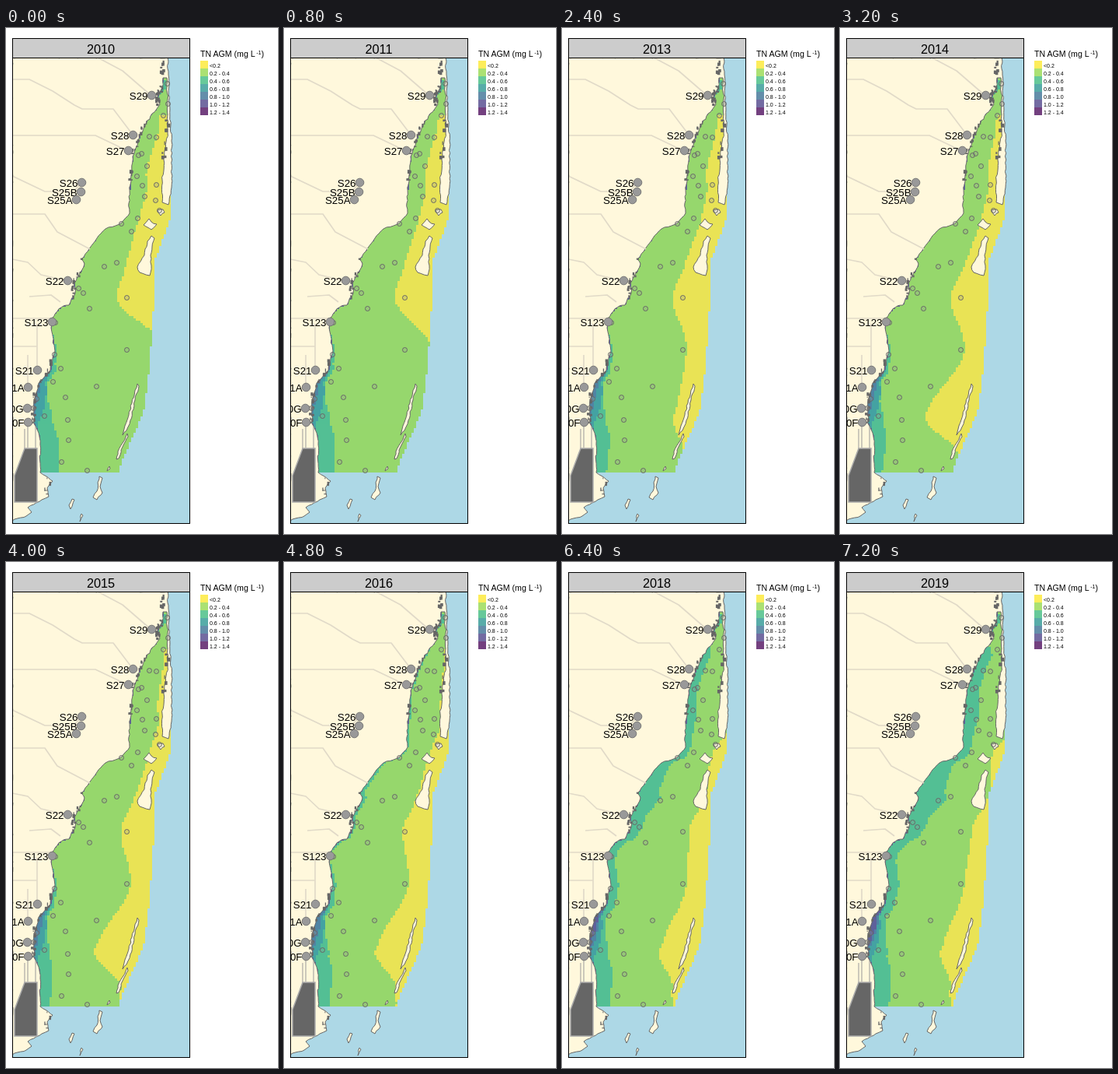
These frames come from a looping animation (350x650 px, 8000 ms). An HTML page:

```html
<!DOCTYPE html>
<html lang="en">
<head>
<meta charset="utf-8">
<title>TN AGM by year</title>
<style>
html, body { margin: 0; width: 100%; height: 100%; overflow: hidden; background: #fff; }
svg { display: block; }
text { font-family: "Liberation Sans", Arial, sans-serif; }
</style>
</head>
<body>
<svg width="350" height="650" viewBox="0 0 350 650">
  <defs><clipPath id="panel"><rect x="8.5" y="38.5" width="228" height="598"/></clipPath></defs>
  <g clip-path="url(#panel)">
    <rect x="8" y="38" width="229" height="599" fill="#add8e6"/>
    <g id="bands" opacity=".75" shape-rendering="crispEdges"></g>
    <g id="land" fill="#fff8dc" stroke="#666" stroke-linejoin="round"></g>
    <g id="canals" fill="none" stroke="#e1dac8" stroke-width="1.7" stroke-linejoin="round"></g>
    <g id="docks" fill="#666"></g>
    <path d="M28 510V539M24 515V540M38 512V540" stroke="#999"/>
    <path d="M24 540H40V609H11V575Z" fill="#666" stroke="#aaa" stroke-width="1.5"/>
    <g id="samples" fill="#999" fill-opacity=".25" stroke="#666"></g>
    <g id="stations" font-size="13.3" text-anchor="end"></g>
  </g>
  <rect x="8.5" y="13.5" width="228" height="25" fill="#ccc" stroke="#000"/>
  <rect x="8.5" y="38.5" width="228" height="598" fill="none" stroke="#000"/>
  <text id="year" x="122" y="33" font-size="16.3" text-anchor="middle"></text>
  <text x="250" y="37" font-size="10.6">TN AGM (mg L<tspan dy="-3.5" dx="1.5" font-size="7">-1</tspan><tspan dy="3.5">)</tspan></text>
  <g id="legend" font-size="7"></g>
</svg>
<script>
const NS = "http://www.w3.org/2000/svg";
const $ = id => document.getElementById(id);
function add(parent, tag, attrs, text) {
  const el = document.createElementNS(NS, tag);
  for (const k in attrs) el.setAttribute(k, attrs[k]);
  if (text) el.textContent = text;
  return $(parent).appendChild(el);
}
const pairs = s => s.split(" ").map(p => p.split(",").map(Number));

let seed = 7;
function rand() {
  seed = (seed * 16807) % 2147483647;
  return seed / 2147483647;
}

// Value at y through [y, value] keys, held beyond both ends
const linear = u => u;
const smooth = u => u * u * (3 - 2 * u);
function along(keys, y, ease = linear) {
  const i = keys.findIndex(k => k[0] >= y);
  if (i < 0) return keys[keys.length - 1][1];
  if (i === 0) return keys[0][1];
  const [a, u] = keys[i - 1], [b, v] = keys[i];
  return u + (v - u) * ease((y - a) / (b - a));
}

// Ragged outline through [x, y] points
function ragged(points, amp) {
  let d = "";
  points.forEach(([x, y], i) => {
    const [u, v] = points[(i + 1) % points.length];
    const n = Math.max(1, Math.round(Math.hypot(u - x, v - y) / 4));
    for (let k = 0; k < n; k++) {
      const jitter = () => k ? (rand() - .5) * 2 * amp : 0;
      d += `${d ? "L" : "M"}${(x + (u - x) * k / n + jitter()).toFixed(1)} ${(y + (v - y) * k / n + jitter()).toFixed(1)}`;
    }
  });
  return d + "Z";
}

// Shores as y,x keys
const shore = pairs("64,202 76,201 88,195 98,198 110,188 126,178 142,171 165,163 190,161 225,158 238,159 251,148 258,128 270,117 297,97 303,101 328,88 340,89 356,81 357,74 364,66 372,60 385,58 415,63 440,57 456,42 480,36 508,36 520,42 535,44 571,44 576,52 582,60 591,53 602,55 606,46 616,28 622,33 627,26 633,8");
const beach = pairs("38,208 60,209 105,211 145,213 205,213 227,209");
const lagoon = pairs("64,207 100,208 135,208 165,204 195,201 224,201");
const sea = pairs("64,208 185,209 205,212 247,211 265,204 300,191 320,192 391,188 440,184 490,178 515,168 545,154 571,144");
const flip = keys => keys.map(([y, x]) => [x, y]);

const mainland = [[8, 38], ...flip(beach), ...flip(lagoon).reverse(), ...flip(shore)];
add("land", "path", {d: ragged(mainland, .9)});
[
  "195,234 202,233 204,237 199,241",
  "177,253 184,245 187,249 194,252 187,259",
  "187,267 191,270 188,281 186,292 187,305 185,318 172,314 169,307 178,292 182,274",
  "169,457 171,460 166,478 164,490 160,504 155,517 150,523 153,511 158,497 162,482",
  "156,521 157,525 150,538 145,553 142,554 144,544",
  "133,563 134,566 130,569",
  "120,576 124,578 121,589 124,597 117,606 112,603 117,595",
  "85,605 88,606 83,618 81,613",
  "97,624 99,626 95,634"
].forEach(s => add("land", "path", {d: ragged(pairs(s), .8)}));

[
  "M8 66H30L60 81 88 99 98 104H138L163 137",
  "M118 38L150 55 187 87",
  "M8 138H115L157 158",
  "M8 190L50 210H87L97 199",
  "M8 239H50L66 262 108 284",
  "M8 297L28 301 45 317 79 325",
  "M30 345L58 343 70 352M8 373H59",
  "M40 380V440M8 409H40M28 462V420"
].forEach(d => add("canals", "path", {d}));

// Docks gather in clusters on the shore
function docks(top, bottom, count, edge) {
  for (let i = 0; i < count; i++) {
    const y = top + rand() * (bottom - top);
    add("docks", "rect", {x: along(edge, y) - rand() * 5, y, width: 1 + rand() * 3, height: 1 + rand() * 4});
  }
}
docks(40, 62, 8, shore);
docks(74, 98, 16, shore);
docks(115, 195, 20, shore);
docks(290, 345, 16, shore);
docks(425, 512, 26, shore);
docks(574, 600, 6, shore);
docks(112, 165, 12, lagoon);

pairs("207,71 208,97 202,112 184,139 193,140 174,161 170,163 181,177 168,190 175,202 193,201 178,216 192,221 197,234 169,244 148,251 161,261 142,301 126,306 93,334 99,340 155,346 107,360 63,378 155,413 62,419 70,437 60,454 116,460 76,474 39,476 49,498 79,503 35,488 80,529 71,557 104,568")
  .forEach(([x, y]) => add("samples", "circle", {cx: x + .5, cy: y + .5, r: 3}));

const stations = {
  S29: [187, 87], S28: [163, 138], S27: [157, 158], S26: [97, 199], S25B: [96, 211], S25A: [90, 221],
  S22: [79, 325], S123: [59, 378], S21: [40, 440], S21A: [28, 462], S20G: [27, 489], S20F: [28, 507]
};
for (const name in stations) {
  const [x, y] = stations[name];
  add("stations", "circle", {cx: x + .5, cy: y - .5, r: 5.3, fill: "#999", stroke: "#737373"});
  add("stations", "text", {x: x - 4.5, y: y + 5}, name);
}

const colors = ["#fde725", "#8fd744", "#35b779", "#21908c", "#31688e", "#443a83", "#440154"];
colors.forEach((fill, i) => {
  const y = 42 + i * 10, from = (i * .2).toFixed(1), to = (i * .2 + .2).toFixed(1);
  add("legend", "rect", {x: 250, y, width: 10, height: 10, fill, opacity: .75, "shape-rendering": "crispEdges"});
  add("legend", "text", {x: 262, y: y + 8.5}, i ? `${from} - ${to}` : "<" + to);
});

// Width of the lowest band, seaward side, t years in
const lowBand = t => [
  [113, 10 - .2 * t * t],
  [200, 30 - .6 * t * t],
  [250, 40 - 2.8 * t],
  [295, 36 - .45 * t * t],
  [345, Math.min(48, 70 - 5.4 * t)],
  [413, Math.min(26, 15 * t - 18)],
  [497, Math.min(34 * t - 71, 81 - 4 * t)],
  [552, Math.min(4 * t - 16, 10)],
  [571, 0]
];

// Width of the 0.4 - 0.6 band, shore side; it spreads north late on
function midBand(t) {
  const g = Math.max(0, t - 5.5);
  return [
    [105, 0], [120, 4 * g], [200, 5 * g], [240, 3 * g], [300, 11 * g], [340, 6 * g], [385, 4 * g],
    [430, 4 + 2.5 * g],
    [500, 20 + Math.abs(t - 4)],
    [571, 10 + Math.max(3.2 * (4 - t), 1.8 * (t - 4))]
  ];
}

const bump = (y, top, bottom, size) =>
  y > top && y < bottom ? size * Math.sin(Math.PI * (y - top) / (bottom - top)) : 0;

const CELL = 3, TOP = 64, BOTTOM = 571;
const snap = x => 2 + CELL * Math.round((x - 2) / CELL);
const bands = colors.slice(0, 6).map(fill => add("bands", "path", {fill}));

function drawYear(t) {
  const d = bands.map(() => "");
  const low = lowBand(t), mid = midBand(t);
  for (let y = TOP; y < BOTTOM; y += CELL) {
    const c = y + CELL / 2, east = along(sea, c), west = along(shore, c);
    const edges = [
      east,
      east - (c < 113 ? 0 : Math.max(0, along(low, c, smooth))),
      west + Math.max(along(mid, c), bump(c, 64, 90, 6)),
      west + bump(c, 438, 518, 14),
      west + bump(c, 440, 502, 4 + .6 * t),
      west + bump(c, 442, 494, Math.max(0, 2.7 * (t - 6))),
      20
    ].map(snap);
    bands.forEach((_, i) => {
      const right = edges[i], left = i < 5 ? edges[i + 1] : 20;
      if (right > left) d[i] += `M${left} ${y}H${right}v${CELL}H${left}z`;
    });
  }
  bands.forEach((b, i) => b.setAttribute("d", d[i]));
  $("year").textContent = 2010 + t;
}

const start = performance.now();
let shown;
function tick(now) {
  const t = Math.floor(Math.max(0, now - start) % 8000 / 800);
  if (t !== shown) drawYear(shown = t);
  requestAnimationFrame(tick);
}
tick(start);
</script>
</body>
</html>
```
